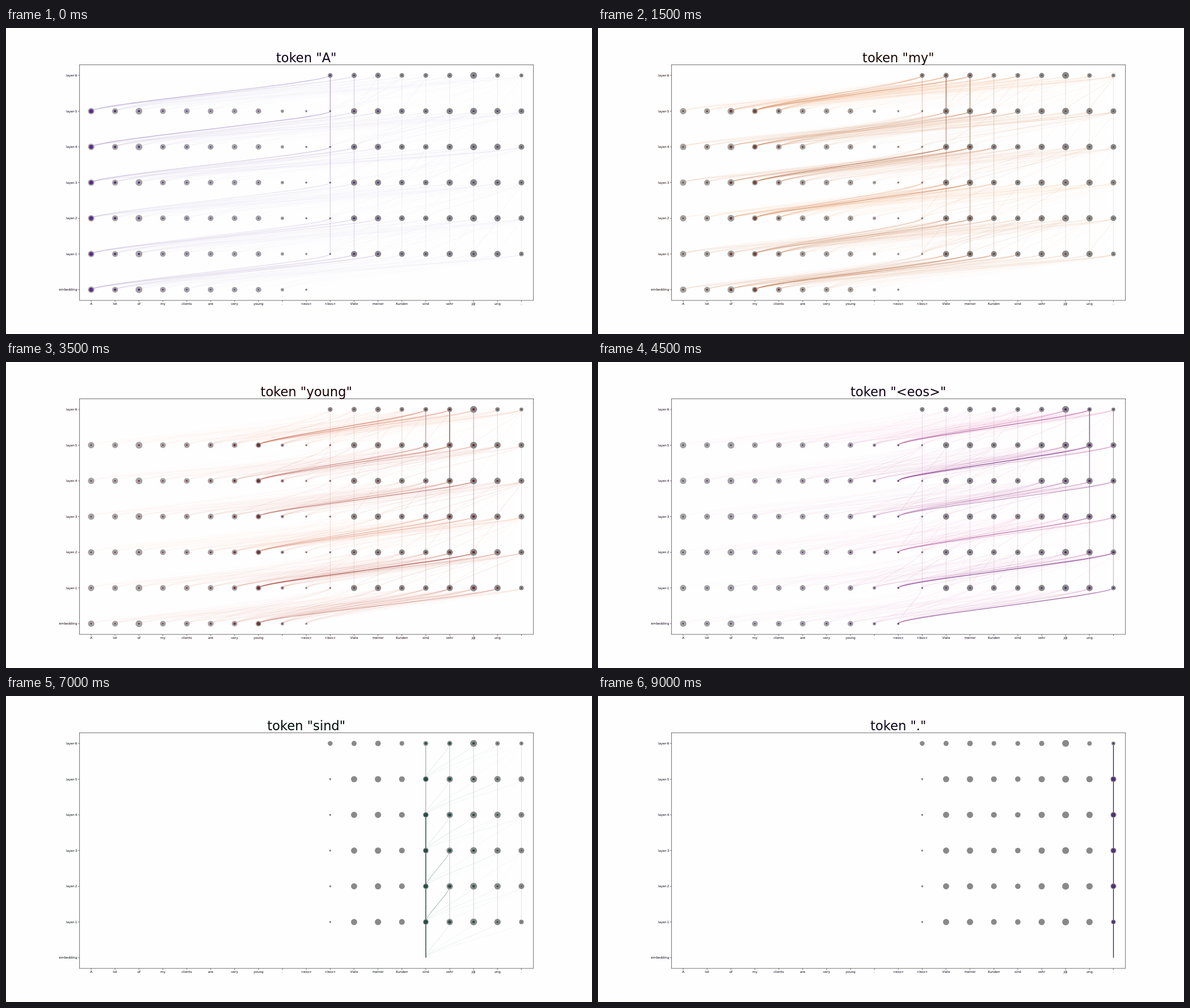
These frames come from a looping animation (1024 by 536 pixels, 9.5 s). An HTML page with a canvas:

```html
<!DOCTYPE html>
<html lang="en">
<head>
<meta charset="utf-8">
<title>Token flow by layer</title>
<style>
html, body { margin: 0; width: 100%; height: 100%; overflow: hidden; background: #fefefe; }
canvas { display: block; }
</style>
</head>
<body>
<canvas id="stage" width="1024" height="536"></canvas>
<script>
const ctx = document.getElementById('stage').getContext('2d');
const STEP = 500, FIRST_OUT = 10, LAST = 18, TOP = 6;
const tokens = ['A', 'lot', 'of', 'my', 'clients', 'are', 'very', 'young', '.', '<eos>',
  '<bos>', 'Viele', 'meiner', 'Kunden', 'sind', 'sehr', 'j@', 'ung', '.'];

// Light and dark end of each token's colour ramp.
const ramps = [
  '9e9ac8 3f007d', '6baed6 08306b', '74c476 00441b', 'fd8d3c 6b2304', 'fb6a4a 67000d',
  'fec44f 662506', 'feb24c 800026', 'fc8d59 700008', 'df65b0 67001f', 'f768a1 49006a',
  '8c96c6 4d004b', '8ab8d4 084081', '74a9cf 023858', '41b6c4 081d58', '94b5b3 053a32',
  '66c2a4 00441b', '78c679 004529', 'bdbdbd 111111', '9e9ac8 3a1570'
].map(r => r.split(' ').map(h => [0, 2, 4].map(k => parseInt(h.slice(k, k + 2), 16))));

const bodyRadii = [5.6, 5.2, 6, 5, 5, 5, 4.9, 4.9, 3, 2, 1.8, 5.4, 5.5, 5, 4.8, 5.5, 6, 5.6, 5];
const topRadii = [4.2, 4.5, 4.9, 4, 4.2, 4.5, 6, 3.9, 3.4];

const columnX = c => 148.8 + 41.77 * c;
const layerY = l => 458.4 - 62.55 * l;
const fade = (a, b, rate) => Math.exp(-Math.abs(a - b) * rate);
const bell = (a, b, rate) => Math.exp(-((a - b) ** 2) * rate);
const mix = (a, b, k) => a.map((v, j) => Math.round(v + (b[j] - v) * Math.min(k, 1)));
const rgba = (c, alpha = 1) => `rgba(${c},${alpha})`;

// Output column an input token mostly feeds; it drifts back in higher layers.
const goal = (token, layer) => FIRST_OUT + .265 * token ** 1.5 + .6 * (1 - layer / 5);
const inputGain = token => token === 0 ? .6 : 1;

function noise(...seed) {
  const v = Math.sin(seed.reduce((sum, n, k) => sum + n * (12.9898 + 21.37 * k), 1)) * 43758.5453;
  return v - Math.floor(v);
}

function link(ramp, layer, from, to, strength) {
  if (strength < .012) return;
  const x0 = columnX(from), x1 = columnX(to), y0 = layerY(layer), y1 = layerY(layer + 1);
  const bend = (y0 - y1) * .2;
  const tone = from === to ? .6 + .4 * strength
    : (layer % 3 === 2 ? .05 : .3) + .75 * strength;
  ctx.strokeStyle = rgba(mix(ramp[0], ramp[1], tone), Math.min(1, strength));
  ctx.lineWidth = .8 + .5 * strength;
  ctx.beginPath();
  ctx.moveTo(x0, y0);
  ctx.bezierCurveTo(x0, y0 - bend, x1, y1 + bend, x1, y1);
  ctx.stroke();
}

function disc(x, y, radius, color) {
  ctx.fillStyle = color;
  ctx.beginPath();
  ctx.arc(x, y, radius, 0, 2 * Math.PI);
  ctx.fill();
}

function inputLink(active, l, a, b) {
  const r = noise(active, l, a, b), near = bell(b, goal(active, l), .35);
  if (a >= FIRST_OUT) return l ? .2 * r ** 3 : 0;
  return .62 * fade(a, active, 1.1) * near * (.45 + .55 * r)
    + .2 * fade(a, active, .2) * r ** 2;
}

function outputLink(active, l, a, b) {
  const r = noise(active, l, a, b);
  if (a > active) return l ? .1 * r ** 2 : 0;
  return .5 * fade(b, a + 1, .45) * (.3 + .7 * r) * (l ? 1 : .7);
}

function trunkStrength(active, l, c) {
  if (c === active) return l < 4 || c === LAST ? 1 : .5;
  if (active >= FIRST_OUT) return .12 + .2 * fade(c, active + 1, .4);
  const rise = .35 + .65 * (l / 5) ** 2;
  return inputGain(active) * (.18 + .65 * bell(c, goal(active, l), .8) * rise);
}

function drawLinks(active, ramp) {
  const input = active < FIRST_OUT;
  const weight = input ? inputLink : outputLink;
  const gain = input ? inputGain(active) : 1;
  for (let l = 0; l < TOP; l++)
    for (let b = Math.max(active, FIRST_OUT); b <= LAST; b++) {
      for (let a = input ? 0 : active; a < b; a++)
        link(ramp, l, a, b, gain * weight(active, l, a, b));
      if (l > 0 || b === active) link(ramp, l, b, b, trunkStrength(active, l, b));
    }
}

function dotShare(active, l, c) {
  if (c < FIRST_OUT) return .23 + .39 * fade(c, active, .7);
  if (active < FIRST_OUT) return .26 + .2 * inputGain(active) * fade(c, goal(active, l), .6);
  if (c === active) return l === TOP ? .5 : .74;
  return .13 + .38 * fade(c, active + 1, .45);
}

function drawNodes(active, ramp) {
  const dotColor = rgba(ramp[1], .75);
  for (let l = 0; l <= TOP; l++)
    for (let c = 0; c <= LAST; c++) {
      const input = c < FIRST_OUT;
      if (input ? l === TOP || active >= FIRST_OUT : l === 0) continue;
      const shrink = l === 1 && c === LAST ? .8 : 1;
      const radius = l === TOP ? topRadii[c - FIRST_OUT] : bodyRadii[c] * shrink;
      const x = columnX(c), y = layerY(l);
      disc(x, y, radius, input ? '#a3a3a3' : '#898989');
      if (active < FIRST_OUT || c >= active)
        disc(x, y, Math.max(.7, radius * dotShare(active, l, c)), dotColor);
    }
}

function drawAxes(active, ramp) {
  ctx.strokeStyle = '#444';
  ctx.lineWidth = .75;
  ctx.strokeRect(128.4, 64.5, 793.3, 412.6);
  ctx.fillStyle = rgba(mix([0, 0, 0], ramp[1], .22));
  ctx.font = '5.6px "DejaVu Sans", sans-serif';
  ctx.beginPath();
  ctx.textAlign = 'right';
  for (let l = 0; l <= TOP; l++) {
    const y = layerY(l);
    ctx.moveTo(125.8, y);
    ctx.lineTo(128.4, y);
    ctx.fillText(l ? 'layer-' + l : 'embedding', 124.2, y + 2);
  }
  ctx.textAlign = 'center';
  tokens.forEach((token, c) => {
    ctx.moveTo(columnX(c), 477);
    ctx.lineTo(columnX(c), 479.7);
    ctx.fillText(token, columnX(c), 485.2);
  });
  ctx.stroke();
  ctx.font = '22.4px "DejaVu Sans", sans-serif';
  ctx.fillText(`token "${tokens[active]}"`, 524.8, 59.5);
}

function draw(active) {
  const ramp = ramps[active];
  ctx.fillStyle = '#fefefe';
  ctx.fillRect(0, 0, 1024, 536);
  drawLinks(active, ramp);
  drawNodes(active, ramp);
  drawAxes(active, ramp);
}

let shown = -1;
function frame() {
  const active = Math.floor(performance.now() / STEP) % tokens.length;
  if (active !== shown) draw(shown = active);
  requestAnimationFrame(frame);
}
frame();
</script>
</body>
</html>
```
